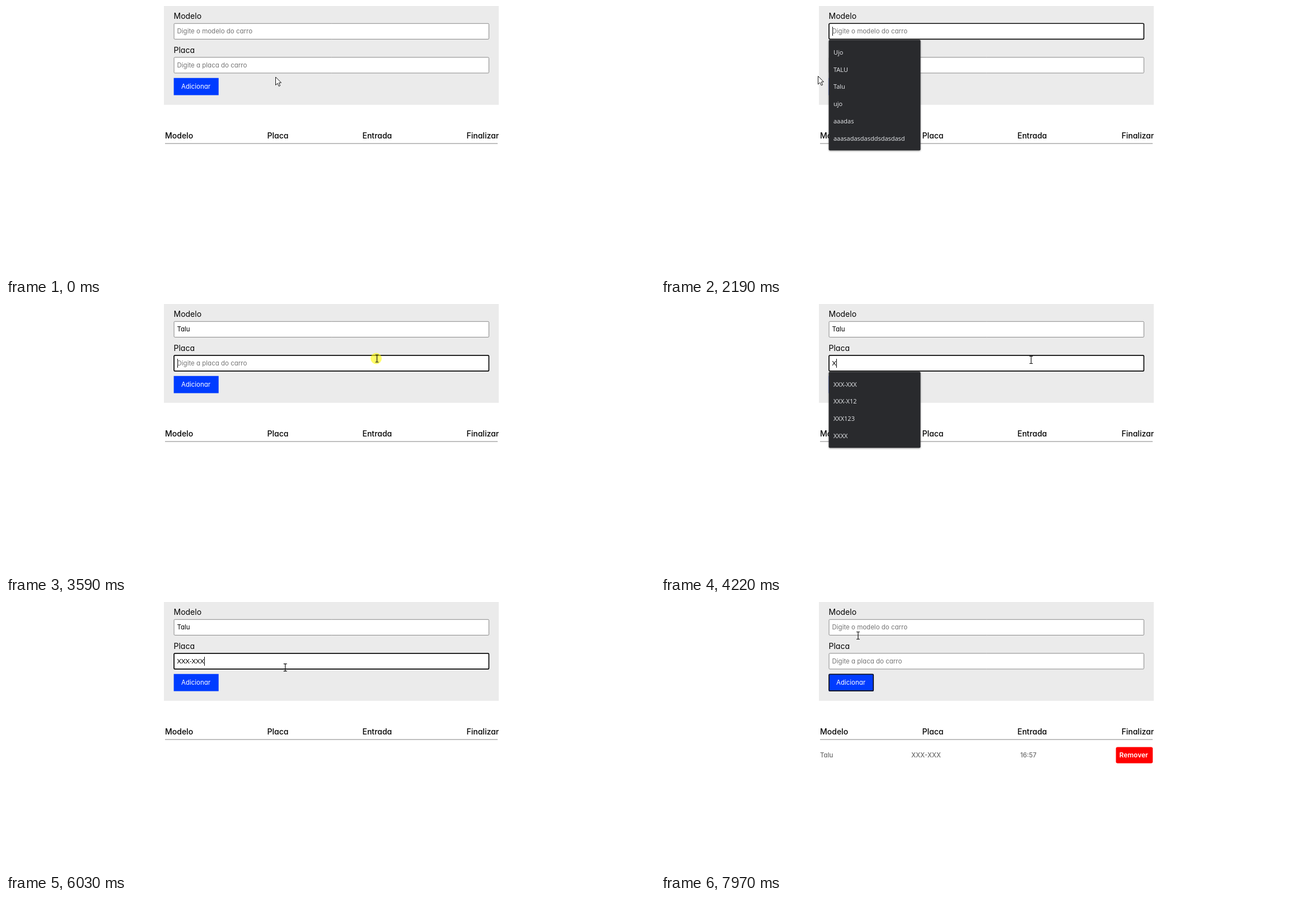
An HTML page with a canvas that plays this animation: 1159 px wide and 483 px high, repeating every 7990 ms.

```html
<!DOCTYPE html>
<html lang="pt">
<head>
<meta charset="utf-8">
<title>Estacionamento</title>
<style>
  html, body { margin: 0; width: 100%; height: 100%; overflow: hidden; background: #fff; }
  #stage { position: absolute; left: 0; top: 0; width: 1159px; height: 483px; overflow: hidden;
    font: 14px/20px Inter, "Open Sans", sans-serif; font-feature-settings: "cv11"; color: #000; }
  canvas { position: absolute; left: 0; top: 0; width: 1159px; height: 483px; }
  #stage span { position: absolute; white-space: pre; }
  .head { font-weight: 500; }
  .cell { font-weight: 500; font-size: 11.5px; color: #6b6b6b; }
  .value { font-size: 11.5px; }
  .plate { font-family: Lato, sans-serif; }
  .hint { color: #757575; }
  .fresh { color: #999; }
  .add { font-size: 11.5px; color: #fff; }
  .remove { font-weight: 600; font-size: 12px; color: #fff; }
  #stage .item { font: 11px/20px "Open Sans", "Noto Sans", sans-serif; color: #e8eaed; }
</style>
</head>
<body>
<div id="stage"></div>
<script>
const LOOP = 7990, W = 1159, H = 483;
const LEFT = 299.6, WIDE = 563.2, TALL = 29;   // form fields
const PRESS = 6320, ADDED = 6420;
const stage = document.getElementById("stage");
const dpr = window.devicePixelRatio || 1;

function layer() {
  const c = stage.appendChild(document.createElement("canvas"));
  c.width = W * dpr;
  c.height = H * dpr;
  const g = c.getContext("2d");
  g.scale(dpr, dpr);
  return g;
}

// Text with its capitals centred on cy
function text(str, x, cy, cls = "") {
  const el = stage.appendChild(document.createElement("span"));
  el.textContent = str;
  el.className = cls;
  el.style.left = x + "px";
  el.style.top = cy - 10 + "px";
  return el;
}

const show = (el, on) => { el.style.display = on ? "" : "none"; };
const inside = (x, y, l, t, w, h) => x >= l && x <= l + w && y >= t && y <= t + h;

function fill(g, color, x, y, w, h, r = 0) {
  g.fillStyle = color;
  g.beginPath();
  g.roundRect(x, y, w, h, r);
  g.fill();
}

function frame(g, color, x, y, w, h, line, r) {
  g.strokeStyle = color;
  g.lineWidth = line;
  g.beginPath();
  g.roundRect(x + line / 2, y + line / 2, w - line, h - line, r);
  g.stroke();
}

const ring = (x, y, w, h) => frame(base, "#101010", x - .4, y - .4, w + .8, h + .8, 1.7, 2);

const base = layer();
text("Modelo", 299.5, 18);
text("Placa", 299.5, 79);
text("Adicionar", 313, 144, "add");
text("Modelo", 284, 231.5, "head");
text("Placa", 466.5, 231.5, "head");
text("Entrada", 636.5, 231.5, "head");
text("Finalizar", 822.5, 231.5, "head");
const row = [
  text("Talu", 284, 274, "cell"),
  text("XXX-XXX", 447, 274, "cell"),
  text("16:57", 641.5, 274, "cell"),
  text("Remover", 818.5, 274, "remove")
];

function makeField(field) {
  const cy = field.top + 14.3;
  field.hint = text(field.hint, 305.5, cy, "value hint");
  field.value = text("", 305.5, cy, "value " + field.cls);
  field.fresh = text("", 0, cy, "value fresh " + field.cls);
  return field;
}

const fields = [
  makeField({
    top: 30.8, hint: "Digite o modelo do carro", cls: "",
    typed: "Talu", start: 2290, gap: 270, focus: 1960, list: 2020, blur: 3590,
    options: ["Ujo", "TALU", "Talu", "ujo", "aaadas", "aaasadasdasddsdasdasd", "teste"]
  }),
  makeField({
    top: 91.4, hint: "Digite a placa do carro", cls: "plate",
    typed: "XXX-XXX", start: 4150, gap: 193, focus: 3590, list: 3680, blur: PRESS,
    options: ["XXX-XXX", "XXX-X12", "XXX123", "XXXX", "aaaa", "asdasd"]
  })
];

const top2d = layer();
const items = Array.from({ length: 6 }, () => text("", 308, 0, "item"));

// Pointer moves: start, end, x, y
const home = [481.5, 127];
const moves = [
  [20, 50, 479, 110], [280, 490, 421, 55], [660, 1380, 418.5, 52.5], [2040, 2180, 280.5, 125.5],
  [3160, 3300, 430, 43], [3300, 3440, 662.5, 97.5], [3990, 4000, 661, 100],
  [5820, 6220, 359, 132], [7470, 7680, 349.5, 85], [7830, 7970, 352, 60]
];
const clicks = [fields[0].focus, fields[1].focus, PRESS];

function pointerAt(t) {
  let [x, y] = home;
  for (const [a, b, toX, toY] of moves) {
    const k = Math.min(1, Math.max(0, (t - a) / (b - a)));
    const e = k * k * (3 - 2 * k);
    x += (toX - x) * e;
    y += (toY - y) * e;
  }
  return [x, y];
}

function valueAt(f, t) {
  if (t < f.start || t >= ADDED) return "";
  return f.typed.slice(0, 1 + Math.floor((t - f.start) / f.gap));
}

function matches(f, v) {
  const found = f.options.filter(o => o.toLowerCase().startsWith(v.toLowerCase())).slice(0, 6);
  return found.length === 1 && found[0] === v ? [] : found;
}

const cursors = {
  arrow(g) {
    g.beginPath();
    for (const [x, y] of [[0, 0], [0, 14.5], [3.4, 11.3], [5.8, 16.5], [8.1, 15.5], [5.8, 10.4], [10, 10.2]])
      g.lineTo(x, y);
    g.closePath();
    g.fill();
    g.stroke();
  },
  beam(g) {
    g.lineWidth = 1.2;
    g.beginPath();
    for (const s of [-6.5, 6.5]) {
      g.moveTo(-3, s);
      g.lineTo(3, s);
    }
    g.moveTo(0, -6.5);
    g.lineTo(0, 6.5);
    g.stroke();
  },
  hand(g) {
    g.beginPath();
    for (let i = 0; i < 4; i++) g.roundRect(2.6 * i - 1.4, i ? 5 + .6 * i : .5, 2.8, 10, 1.4);
    g.roundRect(-1.4, 10, 10.6, 9, 3);
    g.roundRect(-4.4, 9.5, 4.5, 5, 2);
    g.lineWidth = 1.6;
    g.stroke();
    g.fill();
  }
};

function drawPointer(t, x, y, kind) {
  const g = top2d;
  g.save();
  g.translate(x, y);
  if (clicks.some(c => t >= c && t < c + 100)) fill(g, "rgba(255,250,0,.6)", -11.5, -10, 20, 20, 10);
  g.fillStyle = "#fff";
  g.strokeStyle = "#111";
  g.lineWidth = 1;
  cursors[kind](g);
  g.restore();
}

function drawField(f, t, x, y) {
  const v = valueAt(f, t), on = t >= f.focus && t < f.blur;
  const cut = v.length === f.typed.length - 1 && f.cls ? v.length - 1 : v.length;
  f.value.textContent = v.slice(0, cut);
  f.fresh.textContent = v.slice(cut);
  const end = 305.5 + f.value.getBoundingClientRect().width;
  f.fresh.style.left = end + "px";
  show(f.hint, !v);

  const hover = inside(x, y, LEFT, f.top + 1, WIDE, TALL - 2);
  fill(base, "#fff", LEFT, f.top, WIDE, TALL, 2);
  frame(base, hover ? "#4f4f4f" : "#767676", LEFT, f.top, WIDE, TALL, .9, 1.5);
  if (on) {
    ring(LEFT, f.top, WIDE, TALL);
    const caret = end + f.fresh.getBoundingClientRect().width;
    fill(base, cut < v.length ? "#777" : "#000", Math.round(caret), f.top + 6.5, 1, 16);
  }
  return on && t >= f.list ? matches(f, v) : [];
}

function drawList(top, found) {
  const h = 13.2 + 30.73 * found.length, g = top2d;
  g.save();
  g.shadowColor = "rgba(0,0,0,.45)";
  g.shadowBlur = 3 * dpr;
  g.shadowOffsetY = dpr;
  fill(g, "#292a2d", LEFT, top, 163.8, h, 2);
  g.restore();
  items.forEach((el, i) => { el.style.top = top + 12.4 + 30.73 * i + "px"; });
  return h;
}

function render(t) {
  const [x, y] = pointerAt(t);
  let kind = "arrow", found = [], listTop = 0, covered = false;
  base.clearRect(0, 0, W, H);
  top2d.clearRect(0, 0, W, H);
  fill(base, "#ebebeb", 282, 0, 598, 176.8);
  fill(base, "#808080", 284, 245.6, 594, .9);

  for (const f of fields) {
    const list = drawField(f, t, x, y);
    if (list.length) [found, listTop] = [list, f.top + 29.8];
    if (inside(x, y, LEFT, f.top, WIDE, TALL + .5)) kind = "beam";
  }

  items.forEach((el, i) => { el.textContent = found[i] || ""; });
  if (found.length) {
    const h = drawList(listTop, found);
    covered = inside(x, y, LEFT, listTop, 163.8, h);
  }

  const button = [LEFT, 128.8, 80.1, 30.6];
  const over = inside(x, y, ...button);
  if (over) kind = "hand";
  if (covered) kind = "arrow";
  fill(base, over && !covered ? "#0022b3" : "#003cff", ...button);
  if (t >= PRESS) ring(...button);

  const added = t >= ADDED;
  row.forEach(el => show(el, added));
  if (added) fill(base, "#f00", 812.4, 259.4, 65.8, 29.2, 3);
  drawPointer(t, x, y, kind);
}

let start = null;
function tick(now) {
  if (start === null) start = now;
  render((now - start) % LOOP);
  requestAnimationFrame(tick);
}
requestAnimationFrame(tick);
</script>
</body>
</html>
```
